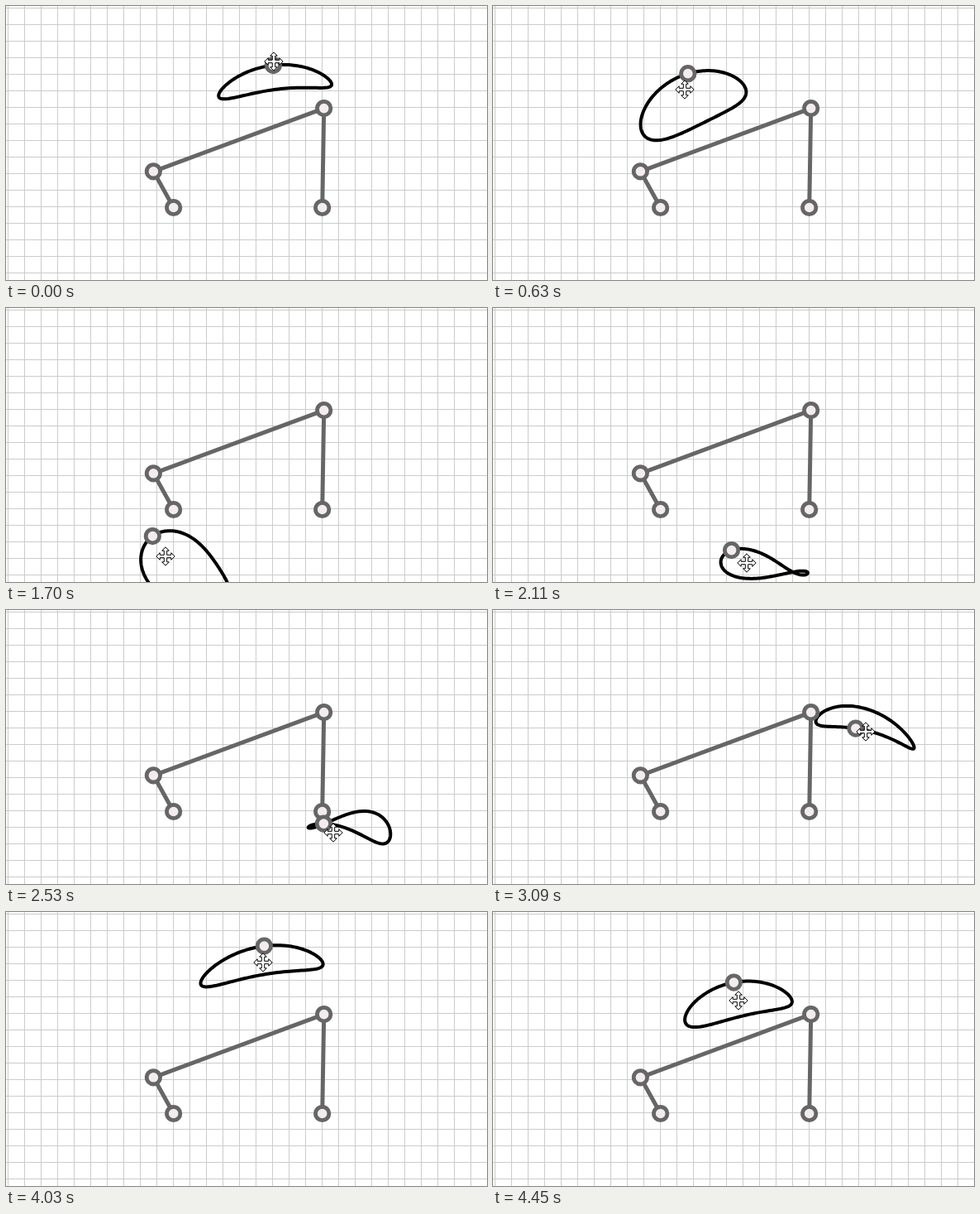
An HTML page that plays this animation: 582x331 px, repeating every 4.6 s.

```html
<!DOCTYPE html>
<html lang="en">
<head>
<meta charset="utf-8">
<title>Four-bar linkage</title>
<style>
  html, body { margin: 0; width: 100%; height: 100%; overflow: hidden; background: #fff; }
  svg { display: block; }
  .link { stroke: #666; stroke-width: 5; fill: none; stroke-linejoin: round; }
  .node { stroke: #666; stroke-width: 4.8; fill: #f3ecee; }
  .curve { stroke: #000; stroke-width: 4; fill: none; stroke-linejoin: round; }
  .cursor { stroke: #000; stroke-width: 1; fill: #fff; stroke-linejoin: miter; }
</style>
</head>
<body>
<svg width="582" height="331" viewBox="0 0 582 331">
  <defs>
    <pattern id="grid" x="2" y="2" width="20" height="20" patternUnits="userSpaceOnUse">
      <path d="M0 0H20V1H1V20H0Z" fill="#ccc" shape-rendering="crispEdges"/>
    </pattern>
  </defs>
  <rect width="582" height="331" fill="#fff"/>
  <rect width="582" height="331" fill="url(#grid)"/>
  <g transform="translate(.4 .1)">
    <path id="curve" class="curve"/>
    <path id="links" class="link"/>
    <g id="joints"></g>
    <circle id="handle" class="node" r="8.2"/>
  </g>
  <path id="cursor" class="cursor"/>
</svg>
<script>
const LOOP = 4600, STEP = 46.84, LAST = 95;
const $ = id => document.getElementById(id);

// Joints: crank pivot, crank end, rocker end, rocker pivot
const A = [202.3, 243.4], B = [178, 199.7], C = [384.3, 123.5], D = [382.3, 243.4];
const dist = (p, q) => Math.hypot(q[0] - p[0], q[1] - p[1]);
const angle = (p, q) => Math.atan2(q[1] - p[1], q[0] - p[0]);
const crank = dist(A, B), coupler = dist(B, C), rocker = dist(C, D);
const crank0 = angle(A, B), tilt0 = angle(B, C);

// Crank end and coupler rotation for one full turn of the crank
const TURN = 180;
const poses = Array.from({ length: TURN }, (_, i) => {
  const a = crank0 + i / TURN * 2 * Math.PI;
  const b = [A[0] + crank * Math.cos(a), A[1] + crank * Math.sin(a)];
  const d = dist(b, D);
  const g = Math.acos((d * d + coupler * coupler - rocker * rocker) / (2 * d * coupler));
  const turn = angle(b, D) - g - tilt0;
  return { b, cos: Math.cos(turn), sin: Math.sin(turn) };
});

function couplerCurve(x, y) {
  const u = x - B[0], v = y - B[1];
  return 'M' + poses.map(({ b, cos, sin }) =>
    (b[0] + u * cos - v * sin).toFixed(2) + ' ' +
    (b[1] + u * sin + v * cos).toFixed(2)).join('L') + 'Z';
}

// Points on the drag path: step, x, y
const path = [
  [0, 323, 71.5], [11, 254, 75], [23, 137, 141], [28, 129, 186], [36, 177, 275.5],
  [46, 300, 291], [54, 384, 258], [58, 393, 229], [66, 438.5, 143], [70, 456, 90],
  [81, 364, 34], [86, 312, 41], [89, 294, 53], [95, 291, 85]
];

const chord = (i, c) => (path[i + 1][c] - path[i][c]) / (path[i + 1][0] - path[i][0]);

// Slope at a point: both chords, the shorter one weighing more
function slope(i, c) {
  if (i === 0) return chord(0, c);
  if (i === path.length - 1) return chord(i - 1, c);
  const before = path[i][0] - path[i - 1][0], after = path[i + 1][0] - path[i][0];
  return (chord(i - 1, c) * after + chord(i, c) * before) / (before + after);
}

// Smooth position on the drag path
function along(k, c) {
  let i = 0;
  while (i < path.length - 2 && path[i + 1][0] <= k) i++;
  const p = path[i], q = path[i + 1], h = q[0] - p[0], s = (k - p[0]) / h;
  const s2 = s * s, s3 = s2 * s;
  return p[c] + (q[c] - p[c]) * (3 * s2 - 2 * s3) +
    h * (slope(i, c) * (s3 - 2 * s2 + s) + slope(i + 1, c) * (s3 - s2));
}

// Four-way arrow: one arm repeated in quarter turns
function moveArrow() {
  const arm = [[-1.7, -1.7], [-1.7, -6.8], [-4.3, -6.8], [0, -11.2], [4.3, -6.8], [1.7, -6.8]];
  const pts = [];
  for (let q = 0; q < 4; q++) {
    for (let [x, y] of arm) {
      for (let n = 0; n < q; n++) [x, y] = [-y, x];
      pts.push(x + ' ' + y);
    }
  }
  return 'M' + pts.join('L') + 'Z';
}

$('links').setAttribute('d', 'M' + [A, B, C, D].map(p => p.join(' ')).join('L'));
$('joints').innerHTML = [A, B, C, D].map(([x, y]) =>
  `<circle class="node" cx="${x}" cy="${y}" r="8.2"/>`).join('');
$('cursor').setAttribute('d', moveArrow());

function draw(t) {
  const k = Math.min(LAST, Math.floor(t / STEP + 0.2));
  const [x, y] = [1, 2].map(c => along(k, c));
  // The handle trails the pointer by one step; the grip slips after the grab
  const [vx, vy] = [1, 2].map(c => along(k + 0.5, c) - along(k - 0.5, c));
  const px = x + vx + 7, py = y + vy + 17 - 22 * Math.exp(-k / 4);
  $('curve').setAttribute('d', couplerCurve(x, y));
  $('handle').setAttribute('cx', x);
  $('handle').setAttribute('cy', y);
  $('cursor').setAttribute('transform', `translate(${Math.round(px)} ${Math.round(py)})`);
}

function tick() {
  draw(performance.now() % LOOP);
  requestAnimationFrame(tick);
}
tick();
</script>
</body>
</html>
```
